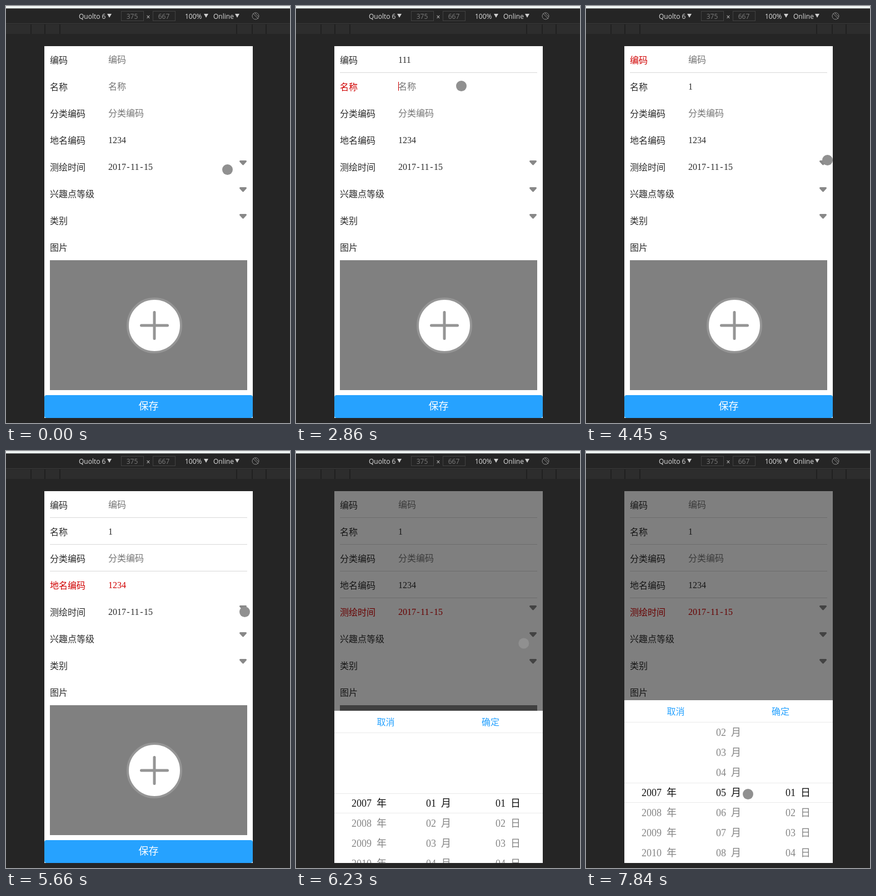
Animation of 511x748 px, one loop 7990 ms. Source, as an HTML page:

```html
<!DOCTYPE html>
<html lang="zh">
<head>
<meta charset="utf-8">
<title>Form</title>
<style>
html, body { margin: 0; width: 100%; height: 100%; overflow: hidden; background: #252525; }
svg { display: block; width: 511px; height: 748px; }
text { font: 300 16px "Liberation Serif", "Noto Sans CJK SC", "Noto Sans CJK", serif; white-space: pre; }
.bar text { font: 12px "Open Sans", "Noto Sans", sans-serif; }
.wheel text { font-size: 18px; }
</style>
</head>
<body>
<script>
const LOOP = 7990, RED = '#d00000', INK = '#2b2b2b', HINT = '#757575', BLUE = '#26a2ff';
const ROW = 48, ITEM = 36;

function el(parent, tag, attrs, str) {
  const node = document.createElementNS('http://www.w3.org/2000/svg', tag);
  for (const k in attrs) node.setAttribute(k, attrs[k]);
  if (str !== undefined) node.textContent = str;
  parent.appendChild(node);
  return node;
}
const set = (node, attrs) => { for (const k in attrs) node.setAttribute(k, attrs[k]); };
const show = (node, on) => node.setAttribute('visibility', on ? 'visible' : 'hidden');
const rect = (p, x, y, width, height, fill, more) => el(p, 'rect', { x, y, width, height, fill, ...more });
const text = (p, x, y, str, fill, more) => el(p, 'text', { x, y, fill, ...more }, str);
const group = (p, attrs) => el(p, 'g', attrs);
const mid = { 'text-anchor': 'middle' };

const svg = el(document.body, 'svg', { viewBox: '0 0 511 748' });
rect(svg, 0, 0, 511, 748, '#252525');

// Browser toolbar
const bar = group(svg, { class: 'bar' });
rect(bar, 0, 0, 511, 4, '#eef3f2');
rect(bar, 0, 4, 511, 1, '#6b6d6d');
rect(bar, 0, 31, 511, 1, '#3c3c3c');
rect(bar, 0, 33, 511, 17, '#2d2d2d');
for (const x of [44, 69, 96, 414, 442, 467]) rect(bar, x, 33, 2, 17, '#202020');
text(bar, 131, 23, 'Quolto 6', '#dcdcdc');
text(bar, 322, 23, '100%', '#dcdcdc');
text(bar, 373, 23, 'Online', '#dcdcdc');
for (const x of [182, 356, 412]) el(bar, 'path', { d: `M${x} 14h8l-4 7z`, fill: '#cfcfcf' });
for (const [x, str] of [[207, '375'], [264, '667']]) {
  rect(bar, x + .5, 9.5, 40, 17, 'none', { stroke: '#424242' });
  text(bar, x + 20, 23, str, '#7c7c7c', mid);
}
text(bar, 256, 24, '×', '#c4c4c4', mid);
el(bar, 'path', { d: 'M443 18a6 6 0 1 1 12 0a6 6 0 1 1-12 0M444.5 13.5l9.5 9.5M447.5 12.5l6.5 6.5', fill: 'none', stroke: '#8c8c8c' });

// Form page
const clip = el(el(svg, 'defs'), 'clipPath', { id: 'page' });
rect(clip, 69, 72, 375, 667);
const page = group(svg, { 'clip-path': 'url(#page)' });
rect(page, 69, 72, 375, 667, '#fff');

const names = ['编码', '名称', '分类编码', '地名编码', '测绘时间', '兴趣点等级', '类别', '图片'];
const rows = names.map((name, i) => {
  const y = 103 + i * ROW;
  const row = { label: text(page, 79, y, name, INK), line: rect(page, 79, y + 16, 355, 1, '#d9d9d9') };
  if (i < 4) row.value = text(page, 184, y - 1, '', INK);
  if (i > 3 && i < 7) {
    el(page, 'path', {
      d: `M421.5 ${y - 16.5}h10l-5 5.5z`, fill: '#888', stroke: '#888', 'stroke-width': 3, 'stroke-linejoin': 'round'
    });
  }
  return row;
});
const date = group(page, {});
for (const [x, str] of [[184, '2017'], [217.3, '-'], [224, '11'], [241.3, '-'], [248, '15']])
  text(date, x, 294, str);
const caret = rect(page, 184, 88, 1, 16, RED);

rect(page, 79, 456, 355, 233, '#808080');
el(page, 'circle', { cx: 267, cy: 573, r: 48, fill: '#fff', stroke: '#959595', 'stroke-width': 4 });
el(page, 'path', { d: 'M243.5 573h47M267 549.5v47', stroke: '#959595', 'stroke-width': 5, 'stroke-linecap': 'round' });
rect(page, 69, 698, 375, 41, BLUE, { rx: 4 });
text(page, 256.5, 724, '保存', '#fff', { ...mid, style: 'font-size:18px;font-weight:400' });
const dim = rect(page, 69, 72, 375, 667, '#000', { opacity: .5 });

// Date picker, laid out at its resting place
const sheet = group(page, {});
rect(sheet, 69, 447, 375, 292, '#fff');
text(sheet, 161.5, 473, '取消', BLUE, mid);
text(sheet, 350, 473, '确定', BLUE, mid);
const wheelClip = el(sheet, 'clipPath', { id: 'wheel' });
rect(wheelClip, 69, 487, 375, 252);
const wheel = group(sheet, { class: 'wheel', 'clip-path': 'url(#wheel)' });
function column(x, unitX, unit, first, count) {
  const col = group(wheel, {});
  for (let i = 0; i < count; i++) {
    const item = group(col, {});
    text(item, x, 619 + i * ITEM, String(first + i).padStart(2, '0'));
    text(item, unitX, 619 + i * ITEM, unit);
  }
  return col;
}
function turn(col, offset) {
  const picked = Math.round(offset / ITEM);
  set(col, { transform: `translate(0 ${-offset})` });
  [...col.children].forEach((item, i) => set(item, { fill: i === picked ? '#111' : '#858585' }));
}
turn(column(100, 145, '年', 2007, 4), 0);
turn(column(359, 386, '日', 1, 4), 0);
const months = column(234, 261, '月', 1, 12);
for (const y of [486, 595, 630]) rect(sheet, 69, y, 375, 1, '#eaeaea');

const pointer = el(svg, 'circle', {});

// Pointer moves: start, end, steps, target x, target y
const moves = [
  [120, 1090, 8, 232, 143], [1220, 1370, 2, 232.5, 98], [1650, 2310, 6, 423, 143],
  [2590, 2860, 3, 297.5, 143.5], [3000, 3130, 2, 297.5, 146], [3410, 3870, 4, 425, 96],
  [4150, 4450, 3, 434.5, 276.5], [4590, 5000, 3, 436, 270], [5270, 5400, 2, 439, 297],
  [5530, 5660, 2, 429.5, 288.5], [5970, 5970, 1, 429.5, 288.5], [6110, 6870, 7, 291.5, 684.5],
  [7020, 7293, 3, 291.5, 615.5], [7430, 7840, 4, 291.5, 615.5]
];
function sample(t) {
  let tick = 0, x = 398.5, y = 293.5;
  for (const [a, b, n, tx, ty] of moves) {
    if (t < a) break;
    const gap = n > 1 ? (b - a) / (n - 1) : 1;
    const k = Math.min(n - 1, Math.floor((t - a) / gap + 1e-6));
    const p = (k + 1) / n;
    tick = a + k * gap;
    x += (tx - x) * p;
    y += (ty - y) * p;
  }
  return { tick, x, y };
}

// Time and row of each focus; time, row and value of each edit
const focuses = [[1090, 0], [2590, 1], [3410, 0], [4790, 3], [5970, 4]];
const edits = [
  [1650, 0, '1'], [1780, 0, '11'], [1910, 0, '111'], [3000, 1, '1'],
  [3560, 0, '11'], [3710, 0, '1'], [3870, 0, '']
];

function draw(t) {
  const { tick, x, y } = sample(t);
  const values = ['', '', '', '1234'];
  let focus = -1, reached = 0, active = 0;
  for (const [at, row] of focuses) {
    if (tick + 2 < at) break;
    focus = row;
    reached = Math.max(reached, row);
    active = at;
  }
  for (const [at, row, value] of edits) {
    if (tick + 2 < at) break;
    values[row] = value;
    active = Math.max(active, at);
  }

  rows.forEach((row, i) => {
    const ink = i === focus ? RED : INK;
    set(row.label, { fill: ink });
    show(row.line, i < reached);
    if (!row.value) return;
    row.value.textContent = values[i] || names[i];
    set(row.value, { fill: values[i] ? ink : HINT });
  });
  set(date, { fill: focus === 4 ? RED : INK });

  show(caret, focus >= 0 && focus < 4 && (tick - active) % 1060 < 530);
  if (focus >= 0 && focus < 4) set(caret, { x: 184 + 8 * values[focus].length, y: 88 + ROW * focus });

  const open = tick >= 5970;
  show(dim, open);
  sheet.setAttribute('display', open ? 'inline' : 'none');
  const left = Math.max(0, 1 - (tick - 5970) / 260);
  set(sheet, { transform: `translate(0 ${89 * left * left})` });

  const spin = tick < 7020 ? 0 : Math.min(1, (tick - 7020 + 137) / 957);
  turn(months, 4 * ITEM * (1 - (1 - spin) ** 2));

  const pressed = tick === 5970;
  set(pointer, {
    cx: x, cy: y, r: pressed ? 10.5 : 9.5,
    fill: pressed ? 'rgba(20,20,20,.6)' : '#909090',
    stroke: pressed ? '#bdbdbd' : 'none', 'stroke-width': 2
  });
}

const start = performance.now();
function frame() {
  draw((performance.now() - start) % LOOP);
  requestAnimationFrame(frame);
}
frame();
</script>
</body>
</html>
```
